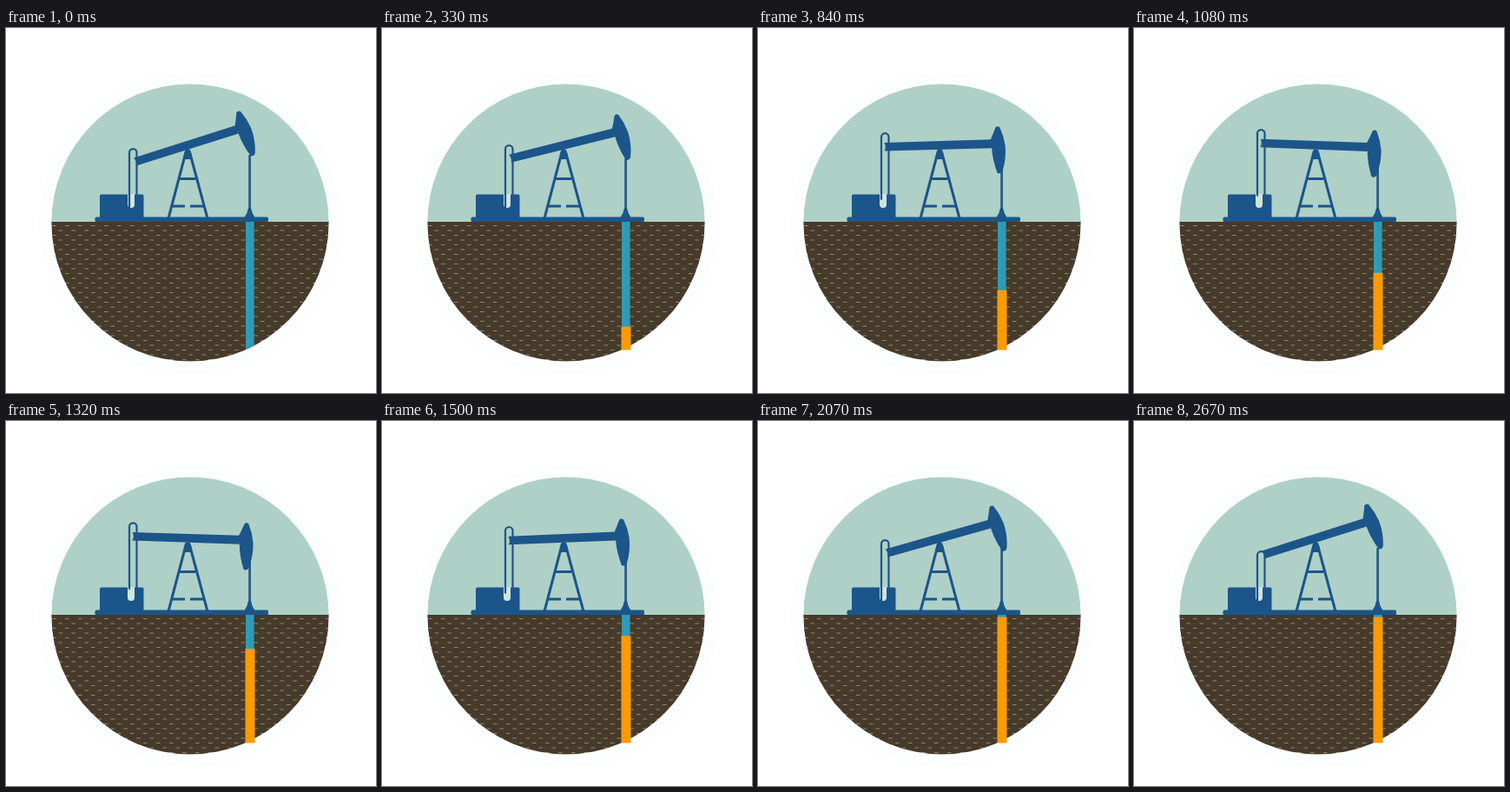
An HTML page that plays this animation: 426x420 px, repeating every 2700 ms.

```html
<!DOCTYPE html>
<html lang="en">
<head>
<meta charset="utf-8">
<title>Oil pump</title>
<style>
  html, body { margin: 0; width: 100%; height: 100%; overflow: hidden; background: #fff; }
  svg { display: block; width: 426px; height: 420px; }
</style>
</head>
<body>
<svg viewBox="0 0 426 420">
  <defs>
    <clipPath id="disc"><circle cx="212" cy="224" r="159.6"/></clipPath>
    <pattern id="soil" x="52" y="223" width="15" height="11" patternUnits="userSpaceOnUse">
      <rect width="15" height="11" fill="#463a2b"/>
      <path d="M1 4.5h4.5M8.5 10h4.5" stroke="#918671" stroke-width="1.2"/>
    </pattern>
  </defs>

  <circle cx="212" cy="225" r="174" fill="#fbfefd"/>
  <g clip-path="url(#disc)">
    <rect x="50" y="60" width="325" height="163" fill="#afd0c7"/>
    <rect x="50" y="223" width="325" height="165" fill="url(#soil)"/>
    <rect x="276" y="223" width="9.6" height="150" fill="#2f9bb7"/>
  </g>
  <rect id="oil" x="275.5" width="11" fill="#f79b07"/>

  <g fill="#1b558a">
    <rect x="102.5" y="217.5" width="199.5" height="5.5" rx="1.5"/>
    <rect x="108" y="191.5" width="50.5" height="28" rx="1.5"/>
    <path d="M140 191v12a4 4 0 0 0 8 0v-12z" fill="#cfe4de"/>
    <path d="M204 151l2-10q3-4 6.500 0l2 10z"/>
    <path d="M207 143L187 219M211.500 143L232 219M200 173.500h18M191 205h15M212 205h15" fill="none" stroke="#1b558a" stroke-width="3"/>
    <rect x="279.300" y="146" width="2.600" height="64"/>
    <path d="M279 207h3q1 6 4.500 11h-12q3.500-5 4.500-11z"/>
    <g id="beam">
      <path d="M-63.500-5L60-5V5L-63.500 4.500Q-61 0-63.500-5z"/>
      <path d="M65-18.500Q67.500-21 70-18.500Q74.500-8 75.700 3Q76.500 18 71.500 32Q69 36 65.500 33.500Q60.500 19 60 5L59-5Q62-11 65-18.500z"/>
    </g>
    <path id="rod" d="M142 77.500V5.300a4.250 4.250 0 0 1 8.500 0V77.500" fill="none" stroke="#1b558a" stroke-width="2.200"/>
  </g>
</svg>
<script>
  const LOOP = 2700;
  // [time in ms, lowering of the head]; below zero only the crank rod goes on
  const steps = [
    [0, 0], [330, .175], [555, .4], [840, .785], [1200, 1], [1320, .96],
    [1620, .6], [1710, .478], [2070, .09], [2160, 0], [2670, -.49], [2700, -.5]
  ];
  const [beam, rod, oil] = ['beam', 'rod', 'oil'].map(id => document.getElementById(id));

  function slope(i) {
    if (i === 0 || steps[i][1] === 1) return 0;
    const a = steps[i - 1], b = steps[Math.min(i + 1, steps.length - 1)];
    return (b[1] - a[1]) / (b[0] - a[0]);
  }

  function lowering(t) {
    let i = 0;
    while (i < steps.length - 2 && t >= steps[i + 1][0]) i++;
    const [t0, a] = steps[i], [t1, b] = steps[i + 1];
    const d = t1 - t0, u = (t - t0) / d, v = 1 - u;
    return v * v * (1 + 2 * u) * a + u * u * (3 - 2 * u) * b
      + d * u * v * (v * slope(i) - u * slope(i + 1));
  }

  function draw(now) {
    const t = now % LOOP, p = lowering(t);
    const angle = -17.7 + 20.3 * Math.max(0, p);
    const top = Math.max(225.5, 371 - .0825 * t);
    beam.setAttribute('transform', `translate(209 135) rotate(${angle})`);
    rod.setAttribute('transform', `translate(0 ${138 - 22.7 * p})`);
    oil.setAttribute('y', top);
    oil.setAttribute('height', Math.max(0, 370.5 - top));
  }

  const start = performance.now();
  function tick() {
    draw(performance.now() - start);
    requestAnimationFrame(tick);
  }
  tick();
</script>
</body>
</html>
```
